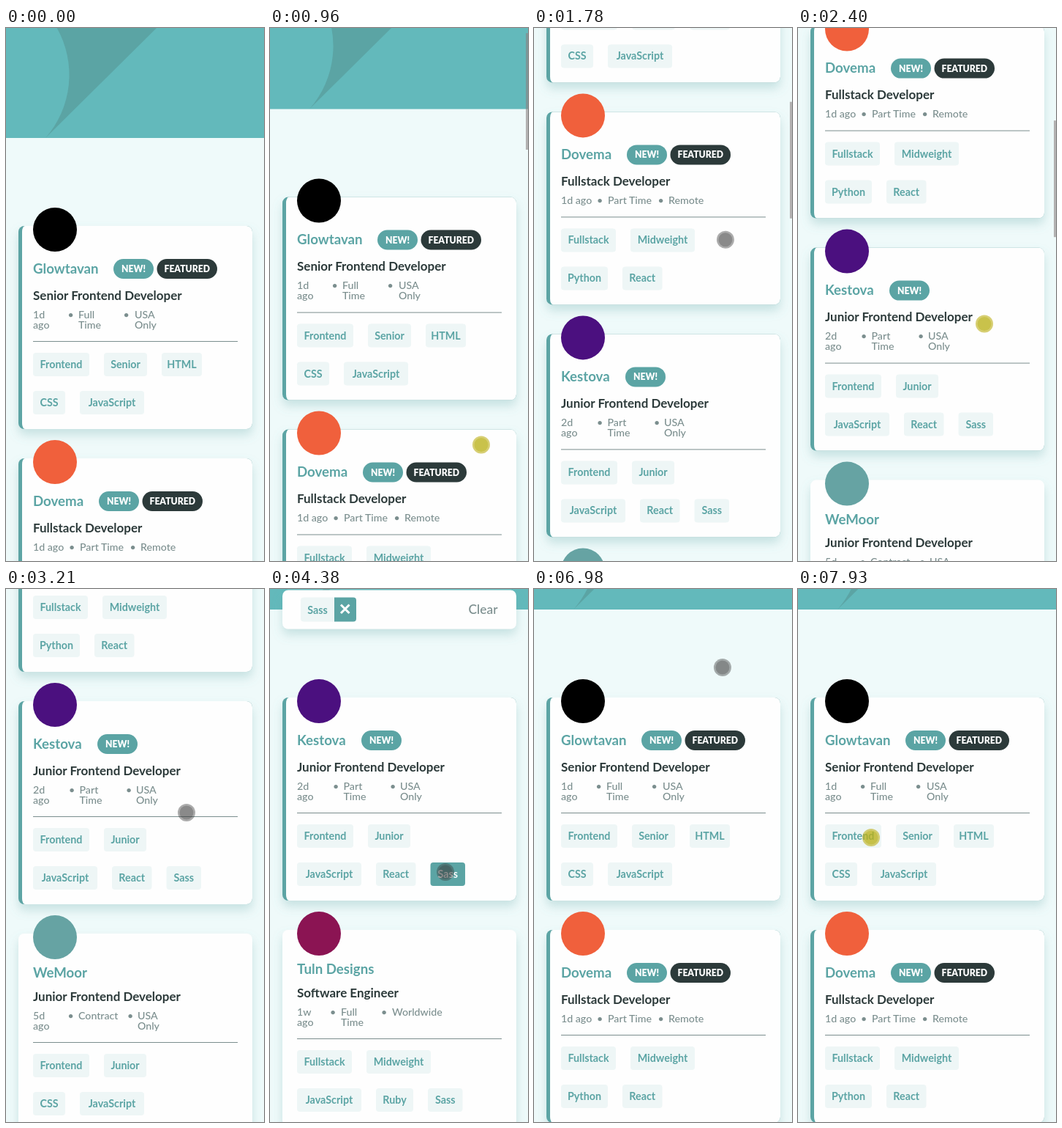
Recreate the animation shown at these times as an HTML page. Size 353 by 727 pixels, loop 8000 ms.

```html
<!DOCTYPE html>
<html lang="en">
<head>
<meta charset="utf-8">
<title>Job listings</title>
<style>
  html, body { margin: 0; width: 100%; height: 100%; overflow: hidden; background: #effafa; }
  svg { display: block; width: 100%; height: 100%; }
  text { font-family: Lato, sans-serif; font-weight: 700; }
  .brand { font-size: 18.7px; fill: #5ba4a4; }
  .job { font-size: 17px; fill: #2c3a3a; }
  .info { font-size: 14.2px; font-weight: 500; fill: #7b8e8e; }
  .tag { font-size: 14.3px; fill: #5ba4a4; text-anchor: middle; }
  .badge { font-size: 12.2px; font-weight: 900; fill: #fff; text-anchor: middle; }
  .clear { font-size: 17.4px; font-weight: 500; fill: #7b8e8e; }
  .on rect { fill: #5ba4a4; }
  .on text { fill: #fff; }
</style>
</head>
<body>
<svg viewBox="0 0 353 727">
  <defs>
    <filter id="shadow" x="-10%" y="-30%" width="120%" height="190%">
      <feDropShadow dx="0" dy="8" stdDeviation="7" flood-color="#5ba4a4" flood-opacity=".28"/>
    </filter>
  </defs>
  <rect width="353" height="727" fill="#effafa"/>
  <g id="page">
    <rect width="353" height="150" fill="#63b9bb"/>
    <path d="M69.7 0A130 130 0 0 1 54 150L206 0Z" fill="#5ba4a4"/>
    <g id="all"></g>
    <g id="filtered"></g>
    <g id="bar">
      <rect x="17" y="123.5" width="320" height="53" rx="8" fill="#fefefe" filter="url(#shadow)"/>
      <rect x="42" y="133.5" width="50" height="33" rx="4" fill="#eef6f6"/>
      <text class="tag" x="65" y="155.5">Sass</text>
      <path d="M88 133.5h26a4 4 0 0 1 4 4v25a4 4 0 0 1-4 4h-26z" fill="#5ba4a4"/>
      <path d="M97 143.5l11.5 11.5m0-11.5l-11.5 11.5" stroke="#fff" stroke-width="3"/>
      <text class="clear" x="271.5" y="156">Clear</text>
    </g>
  </g>
  <rect id="thumb" x="350" width="3" height="159" fill="#8c8282" fill-opacity=".6"/>
  <g id="dot"><circle r="12"/><circle r="9.5"/></g>
</svg>
<script>
const $ = id => document.getElementById(id);
const LOOP = 8000;

const tagWidth = {
  Frontend: 77, Senior: 59, HTML: 55, CSS: 44, JavaScript: 88, Fullstack: 75,
  Midweight: 88, Python: 64, React: 54.5, Sass: 47.5, Junior: 58, Ruby: 51
};

// info: [x, text] pairs; a "/" in the text breaks the line
const glow = {
  brand: 'Glowtavan', logo: '#000', badgeX: 147, featured: true, job: 'Senior Frontend Developer',
  info: [[37, '1d/ago'], [84.5, '•'], [99, 'Full/Time'], [160.5, '•'], [176, 'USA/Only']],
  tags: [['Frontend', 'Senior', 'HTML'], ['CSS', 'JavaScript']]
};
const dovema = {
  brand: 'Dovema', logo: '#f0603c', badgeX: 127, featured: true, job: 'Fullstack Developer',
  info: [[37, '1d ago'], [86, '•'], [101, 'Part Time'], [169.5, '•'], [184, 'Remote']],
  tags: [['Fullstack', 'Midweight'], ['Python', 'React']]
};
const kestova = {
  brand: 'Kestova', logo: '#4b107f', badgeX: 125, job: 'Junior Frontend Developer',
  info: [[37, '2d/ago'], [86, '•'], [100.5, 'Part/Time'], [164, '•'], [178, 'USA/Only']],
  tags: [['Frontend', 'Junior'], ['JavaScript', 'React', 'Sass']]
};
const moor = {
  brand: 'WeMoor', logo: '#66a3a3', job: 'Junior Frontend Developer',
  info: [[37, '5d/ago'], [84.5, '•'], [99, 'Contract'], [166, '•'], [180, 'USA/Only']],
  tags: [['Frontend', 'Junior'], ['CSS', 'JavaScript']]
};
const tuln = {
  brand: 'Tuln Designs', logo: '#8b1453', job: 'Software Engineer',
  info: [[37, '1w/ago'], [82, '•'], [97, 'Full/Time'], [152, '•'], [167, 'Worldwide']],
  tags: [['Fullstack', 'Midweight'], ['JavaScript', 'Ruby', 'Sass']]
};

const rect = (x, y, w, h, r, fill, extra = '') =>
  `<rect x="${x}" y="${y}" width="${w}" height="${h}" rx="${r}" fill="${fill}" ${extra}/>`;
const text = (cls, x, y, str) => `<text class="${cls}" x="${x}" y="${y}">${str}</text>`;
const badge = (x, w, fill, str) =>
  rect(x, 45, w, 27, 13.5, fill) + text('badge', x + w / 2, 63, str);

function tagRow(names, y, active) {
  let x = 37;
  return names.map(name => {
    const w = tagWidth[name];
    const out = `<g class="${name === active ? 'on' : ''}">` +
      rect(x, y, w, 32, 4, '#eef6f6') + text('tag', x + w / 2, y + 21, name) + '</g>';
    x += w + 20;
    return out;
  }).join('');
}

const cardHeight = c =>
  263 + (c.info.some(i => i[1].includes('/')) ? 14 : 0) - (c.badgeX ? 0 : 9);

function card(c, top, active) {
  const h = cardHeight(c), up = c.badgeX ? 0 : 9;
  let s = rect(17, 0, 320, h, 8, c.badgeX ? '#5ba4a4' : '#fefefe', 'filter="url(#shadow)"');
  if (c.badgeX) {
    s += `<path fill="#fefefe" d="M26 0H329a8 8 0 0 1 8 8V${h - 8}a8 8 0 0 1-8 8H26a4 8 0 0 1-4-8V8a4 8 0 0 1 4-8z"/>`;
    s += badge(c.badgeX, 55, '#5ba4a4', 'NEW!');
    if (c.featured) s += badge(c.badgeX + 59.5, 82.5, '#2c3a3a', 'FEATURED');
  }
  s += `<circle cx="67" cy="5" r="30" fill="${c.logo}"/>`;
  s += text('brand', 37, 64.5 - up / 2, c.brand) + text('job', 37, 100.5 - up, c.job);
  for (const [x, str] of c.info)
    str.split('/').forEach((line, i) => s += text('info', x, 125.5 - up + 14 * i, line));
  s += rect(37, h - 120, 280, 1, 0, '#7b8e8e');
  s += tagRow(c.tags[0], h - 104) + tagRow(c.tags[1], h - 52, active);
  return `<g transform="translate(0 ${top})">${s}</g>`;
}

function list(cards, active) {
  let top = 270;
  return cards.map((c, i) => {
    const out = card(c, top, i ? '' : active);
    top += cardHeight(c) + 40;
    return out;
  }).join('');
}

$('all').innerHTML = list([glow, dovema, kestova, moor]);
$('filtered').innerHTML = list([kestova, tuln], 'Sass');

// Monotone cubic through [time, value] points
function curve(pts) {
  const n = pts.length;
  const slope = i => (pts[i + 1][1] - pts[i][1]) / (pts[i + 1][0] - pts[i][0]);
  const tangent = i => {
    if (i === 0 || i === n - 1) return 0;
    const a = slope(i - 1), b = slope(i);
    return a * b > 0 ? 2 * a * b / (a + b) : 0;
  };
  return t => {
    if (t <= pts[0][0]) return pts[0][1];
    if (t >= pts[n - 1][0]) return pts[n - 1][1];
    let i = 0;
    while (t > pts[i + 1][0]) i++;
    const [t0, v0] = pts[i], [t1, v1] = pts[i + 1];
    const d = t1 - t0, u = (t - t0) / d, w = 1 - u;
    return v0 * w * w * (1 + 2 * u) + v1 * u * u * (3 - 2 * u)
      + d * u * w * (tangent(i) * w - tangent(i + 1) * u);
  };
}

const scroll = curve([[840, 0], [960, 39], [1450, 365], [1650, 440], [1900, 492],
  [2180, 510], [2400, 590], [2740, 737]]);
const path = [[330, 330, 745], [760, 294, 625], [840, 293, 615], [960, 289, 569],
  [1450, 267, 236], [1550, 264, 205], [2180, 259, 480], [2400, 255, 404],
  [2700, 249, 262], [2870, 248, 268], [3070, 248, 300], [3210, 247, 305],
  [3700, 240, 386], [4400, 240, 386], [4800, 284, 146], [5010, 285, 134],
  [5700, 285, 133], [6280, 286, 31], [6700, 286, 31], [7520, 150, 325], [7930, 100, 339]];
const dotX = curve(path.map(p => [p[0], p[1]]));
const dotY = curve(path.map(p => [p[0], p[2]]));
const presses = [[840, 1540], [2180, 2700], [3760, 3900], [6480, 6620], [7900, LOOP]];

const show = (id, on) => $(id).setAttribute('display', on ? 'inline' : 'none');

function render(t) {
  const clicked = t >= 3900, filtered = clicked && t < 6620;
  const s = clicked ? 122 : scroll(t);
  $('page').setAttribute('transform', `translate(0 ${-s.toFixed(2)})`);
  show('all', !filtered);
  show('filtered', filtered);
  show('bar', filtered && t >= 4000);

  $('thumb').setAttribute('y', Math.max(0, (s - 7) * 0.2163));
  $('thumb').setAttribute('opacity', t < 840 ? 0 : Math.min(1, Math.max(0, (3070 - t) / 220)));

  const pressed = presses.some(([a, b]) => t >= a && t < b);
  const [outer, inner] = $('dot').children;
  outer.setAttribute('fill', pressed ? 'rgba(190,178,30,.62)' : 'rgba(60,60,60,.42)');
  inner.setAttribute('fill', pressed ? 'rgba(182,176,20,.42)' : 'rgba(60,60,60,.3)');
  show('dot', t >= 330);
  $('dot').setAttribute('transform', `translate(${dotX(t).toFixed(2)} ${dotY(t).toFixed(2)})`);
}

const start = performance.now();
function tick() {
  render((performance.now() - start) % LOOP);
  requestAnimationFrame(tick);
}
tick();
</script>
</body>
</html>
```
